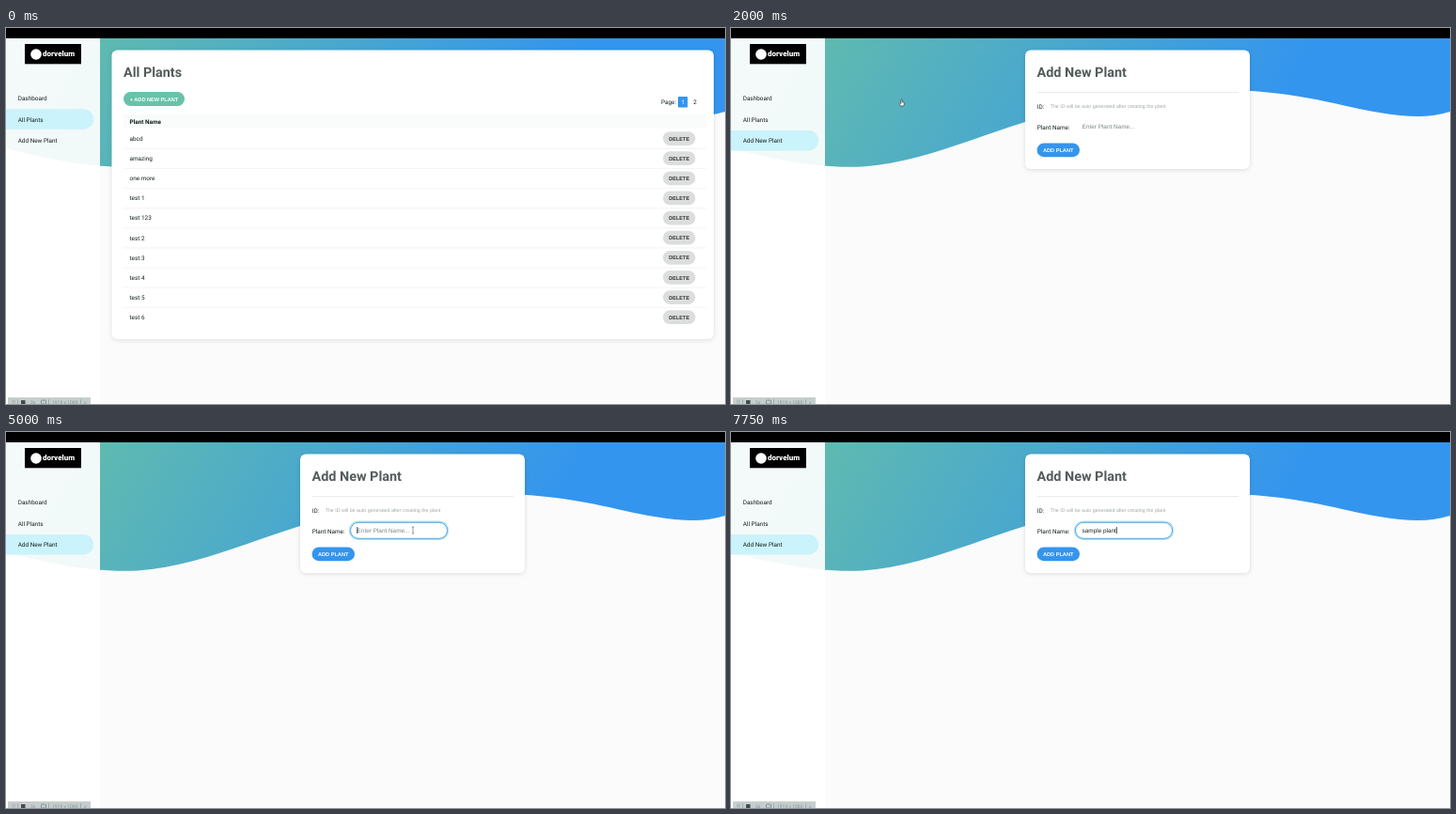
An HTML page that plays this animation: 765x400 px, repeating every 8 s.

```html
<!DOCTYPE html>
<html lang="en">
<head>
<meta charset="utf-8">
<title>Plants</title>
<style>
  html, body { margin: 0; width: 100%; height: 100%; overflow: hidden; }
  svg { display: block; width: 100vw; height: 100vh; text-rendering: geometricPrecision; }
  text { font: 6.4px Roboto, sans-serif; fill: #16201f; white-space: pre; }
  .title { font-size: 14.4px; font-weight: 700; fill: #535b5b; }
  .bold { font-weight: 700; }
  .button { font: 700 5.6px "Liberation Sans", sans-serif; fill: #fff; text-anchor: middle; }
  .field { font: 6.4px "Liberation Sans", sans-serif; }
  .hint { font: 5.27px "Liberation Sans", sans-serif; fill: #a2a8a8; }
  .brand { font-size: 8px; font-weight: 900; fill: #fff; }
  .tool { font-size: 5px; fill: #83989f; }
  .card { fill: #fff; filter: drop-shadow(0 1px 2.5px rgb(0 0 0 / .12)); }
</style>
</head>
<body>
<svg viewBox="0 0 765 400" preserveAspectRatio="none">
  <defs>
    <linearGradient id="sea" gradientUnits="userSpaceOnUse" x1="90" y1="0" x2="500" y2="230">
      <stop stop-color="#60bbae"/><stop offset="1" stop-color="#3495ee"/>
    </linearGradient>
  </defs>
  <rect width="765" height="400" fill="#fafbfa"/>
  <path fill="url(#sea)" d="M0 11V128C40 138 90 150 140 147.500C200 143 255 118 313 100C390 75 470 64 530 66C610 68 650 84 690 90C720 95 745 96 765 89V11Z"/>

  <g id="sidebar">
    <rect y="11" width="100" height="389" fill="#fff" opacity=".92"/>
    <path id="active" fill="#cbf3fc"/>
    <rect x="20" y="17" width="60" height="21.300" fill="#000"/>
    <circle cx="32" cy="28" r="5.800" fill="#fff"/>
    <text class="brand" x="39" y="30.300">dorvelum</text>
    <text x="12.700" y="77">Dashboard</text>
    <text x="12.700" y="99.600">All Plants</text>
    <text x="12.700" y="122.200">Add New Plant</text>
  </g>

  <g id="recorder">
    <rect x="2" y="393" width="88" height="7" fill="#c6cecd"/>
    <path d="M7 395.500v4M9 395.500v4M12.500 395v5M45.500 395v5M79.500 395v5" stroke="#8fa0a3" stroke-width=".7"/>
    <rect x="16" y="396" width="4.500" height="4" fill="#444c4c"/>
    <rect x="37.500" y="396" width="5" height="4" rx="1" fill="none" stroke="#7896a0"/>
    <text class="tool" x="26" y="399.800">3s</text>
    <text class="tool" x="49" y="399.800">1919 x 1080</text>
    <text class="tool" x="83" y="399.800">x</text>
  </g>

  <g id="listPage">
    <rect class="card" x="112.500" y="23.500" width="640.500" height="307.500" rx="6"/>
    <text class="title" x="125" y="51.700">All Plants</text>
    <rect id="addLink" x="125" y="68" width="65" height="15" rx="7.500"/>
    <text class="button" x="157.500" y="77.500">+ ADD NEW PLANT</text>
    <text x="697" y="81.300">Page:</text>
    <rect x="715" y="73" width="10.300" height="11.500" rx="1" fill="#3495ee"/>
    <text x="718.400" y="81.300" style="fill:#fff">1</text>
    <text x="731.300" y="81.300">2</text>
    <rect x="125" y="92" width="620" height="15" fill="#fafbfb"/>
    <text class="bold" x="131.500" y="102">Plant Name</text>
    <g id="rows"></g>
  </g>

  <g id="formPage">
    <rect class="card" x="313" y="23.500" width="239" height="126.500" rx="6"/>
    <text class="title" x="325.500" y="51.700">Add New Plant</text>
    <path d="M326 68.500H540" stroke="#e3e6e6" stroke-width=".8"/>
    <text x="325.700" y="85.500" font-weight="500">ID:</text>
    <text class="hint" x="339.700" y="85.300">The ID will be auto generated after creating the plant</text>
    <text x="325.700" y="107.500" font-weight="500">Plant Name:</text>
    <g id="focusRing" fill="#fff">
      <rect x="366" y="95.800" width="104" height="18" rx="9" stroke="#a8e4f8" stroke-width="2.400"/>
      <rect x="366.500" y="96.300" width="103" height="17" rx="8.500" stroke="#4d9fd6" stroke-width=".9"/>
    </g>
    <text id="entry" class="field" x="373.600" y="106.900"></text>
    <rect id="caret" y="101" width=".8" height="7.200" fill="#222"/>
    <rect x="325.500" y="122.500" width="45.500" height="14.700" rx="7.350" fill="#3495ee"/>
    <text class="button" x="348.200" y="131.900">ADD PLANT</text>
  </g>

  <rect width="765" height="11" fill="#000"/>

  <g id="pointer" stroke-linejoin="round" stroke-width=".6">
    <path id="arrow" d="M0 0V6L1.400 4.700L2.400 7L3.300 6.600L2.300 4.400H4.200Z" fill="#fff" stroke="#222"/>
    <path id="hand" d="M-.6 -3.300Q0 -4 .6 -3.300V-.8L2.700 -.2V2L2 3.500H-1L-2.500 1L-1.800 .3L-.6 1Z" fill="#fff" stroke="#222"/>
    <path id="beam" d="M-1.200 -3.500H1.200M0 -3.500V3.500M-1.200 3.500H1.200" fill="none" stroke="#555"/>
  </g>
</svg>
<script>
const LOOP = 8000, STEP = 250;
const PLACEHOLDER = "Enter Plant Name...";
const NAMES = ["abcd", "amazing", "one more", "test 1", "test 123",
  "test 2", "test 3", "test 4", "test 5", "test 6"];
const TYPING = [[6250, 1], [6500, 2], [6750, 4], [7000, 6], [7250, 8], [7500, 10], [7750, 12]];
const $ = id => document.getElementById(id);
const show = (id, visible) => $(id).style.display = visible ? "" : "none";

$("rows").innerHTML = NAMES.map((name, i) => `
  <g transform="translate(0 ${i * 21.13})">
    <text x="131.500" y="119.900">${name}</text>
    <rect x="699" y="110.200" width="34.500" height="14.700" rx="7.350" fill="#dcdedd"/>
    <text class="button" x="716.200" y="119.600" style="fill:#303736">DELETE</text>
    ${i < NAMES.length - 1 ? '<path d="M125 128.300H745" stroke="#eef0f0" stroke-width=".7"/>' : ""}
  </g>`).join("");

function glide(time, start, end, from, to) {
  const p = Math.min(1, Math.max(0, (time - start) / (end - start)));
  const eased = p * p * (3 - 2 * p);
  return from.map((v, i) => v + (to[i] - v) * eased);
}

function render(time) {
  const t = Math.floor(time % LOOP / STEP) * STEP;
  const onForm = t >= 2000, focused = t >= 3250;
  const hovering = t >= 1250 && !onForm;

  show("listPage", !onForm);
  show("formPage", onForm);
  const top = onForm ? 109 : 86.3;
  $("active").setAttribute("d", `M0 ${top}H82.500a10.700 10.700 0 0 1 0 21.400H0Z`);
  $("addLink").setAttribute("fill", hovering ? "#437a6c" : "#68c2a9");
  $("addLink").style.filter = hovering ? "drop-shadow(0 1px 1.5px rgb(0 0 0 / .3))" : "";

  const [x, y] = onForm
    ? glide(t, 2000, 3250, [181.5, 79.5], [433, 104.500])
    : glide(t, 0, 1500, [300, 240], [181.5, 79.5]);
  const overField = onForm && x > 366 && y > 95;
  const overLink = hovering || t === 2000;
  show("pointer", t > 0 && t < 5250);
  $("pointer").setAttribute("transform", `translate(${x} ${y})`);
  show("beam", overField);
  show("hand", overLink);
  show("arrow", !overField && !overLink);

  const count = TYPING.reduce((n, [at, length]) => t >= at ? length : n, 0);
  const entry = $("entry");
  entry.textContent = count ? "sample plant".slice(0, count) : PLACEHOLDER;
  entry.style.fill = count ? "#1c2222" : "#7c8585";
  show("focusRing", focused);
  show("caret", t >= 4250);
  $("caret").setAttribute("x", onForm && count ? 373.6 + entry.getComputedTextLength() : 373.4);
}

const start = performance.now();
function tick() {
  render(performance.now() - start);
  requestAnimationFrame(tick);
}
tick();
</script>
</body>
</html>
```
